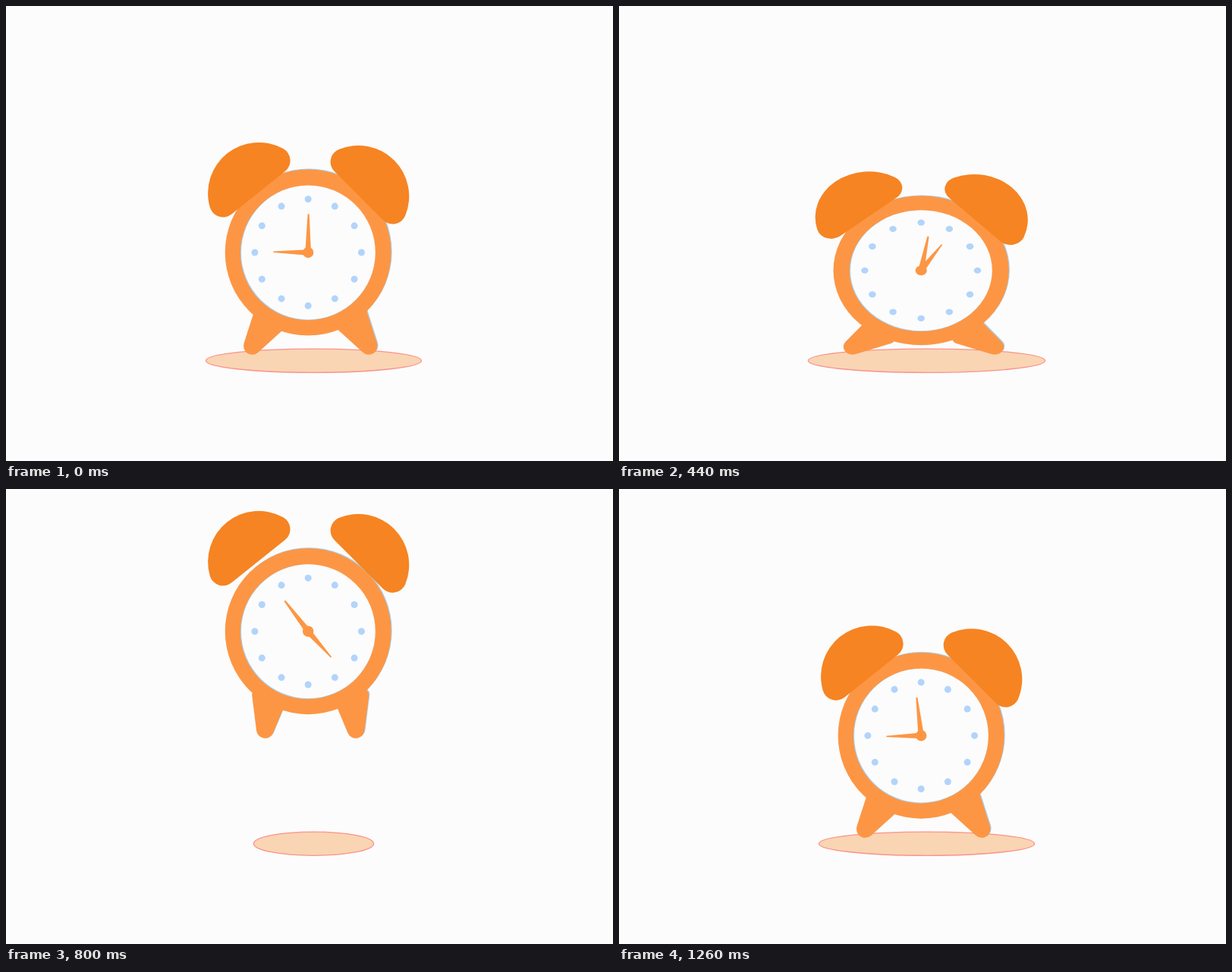
An HTML page for the animation above (1280 ms loop, 800 by 600 pixels).

```html
<!DOCTYPE html>
<html lang="en">
<head>
<meta charset="utf-8">
<title>Jumping alarm clock</title>
<style>
  html, body { margin: 0; width: 100%; height: 100%; overflow: hidden; background: #fcfcfc; }
  svg { display: block; width: 100vw; height: 100vh; }
  .body { fill: #fd9644; }
  .bell { fill: #f68422; }
  .edge { fill: #a9d0f0; }
  .face { fill: #fcfcfc; }
  .dot { fill: #b2d4fb; }
  #shadow { fill: #f9d5b3; stroke: #fc918a; stroke-width: 1.3; }
</style>
</head>
<body>
<svg viewBox="0 0 800 600">
  <defs>
    <path id="footShape" d="M-23.15 0A8 8 0 0 1-15.4-10H15.4A8 8 0 0 1 23.15 0L11.13 44.9A11.5 11.5 0 0 1-11.13 44.9Z"/>
    <path id="bellShape" d="M-45.2-1A18 18 0 0 1-61.8-26A67 67 0 0 1 61.8-26A18 18 0 0 1 45.2-1Z"/>
    <g id="frame">
      <use class="footL" href="#footShape"/>
      <use class="footR" href="#footShape"/>
      <circle r="109.5"/>
    </g>
  </defs>
  <ellipse id="shadow" cx="405.5" cy="467.7" ry="15.6"/>
  <g id="clock">
    <use class="edge" href="#frame" transform="translate(1 -1)"/>
    <use class="body" href="#frame"/>
    <circle class="edge" cx="-.6" cy=".6" r="88.7"/>
    <circle class="face" cx=".2" r="88.4"/>
    <g id="dots" class="dot"></g>
    <g class="body">
      <path id="minute" d="M-3.7-2L-1.1-50Q0-52 1.1-50L3.7-2Z"/>
      <path id="hour" d="M-3.8-2L-.8-45.5Q0-46.8 .8-45.5L3.8-2Z"/>
      <circle r="7.2"/>
    </g>
    <g id="bells" class="bell">
      <use href="#bellShape" transform="translate(-65 -78) rotate(-38.7)"/>
      <use href="#bellShape" transform="translate(66 -74) rotate(45)"/>
    </g>
  </g>
</svg>
<script>
const LOOP = 1280, STEP = 20;   // ms
const FPS = 120, LENGTH = 152;  // keys below count in 1/120 s

const smooth = u => u * u * (3 - 2 * u);
const fall = u => u * u;

// Key poses: crouch, jump, land, settle.
const motion = {
  y: [[0, 325], [36, 355], [47, 355], [90, 187.7], [96, 187.7], [131, 354, fall], [LENGTH, 325]],
  wide: [[0, 1], [32, 1.058], [48, 1.058], [90, 1], [104, 1], [130, 1.055], [LENGTH, 1]],
  tall: [[0, 1], [32, .897], [48, .897], [96, 1], [126, .9], [LENGTH, 1]],
  splay: [[0, 32.7], [42, 67], [80, -2], [115, 20.5], [131, 60], [LENGTH, 32.7]],
  ring: [[0, 0], [52, 0], [76, 4.5], [114, -29], [131, 0], [LENGTH, 0]],
  shadow: [[0, 142], [42, 163.5], [97, 79], [131, 161], [LENGTH, 142]]
};

function valueAt(keys, frame) {
  const i = keys.findIndex(([at]) => at > frame);
  const [start, from] = keys[i - 1];
  const [end, to, ease = smooth] = keys[i];
  return from + (to - from) * ease((frame - start) / (end - start));
}

const $ = id => document.getElementById(id);
const place = (el, value) => el.setAttribute('transform', value);
const footL = document.querySelector('.footL');
const footR = document.querySelector('.footR');

for (let i = 0; i < 12; i++) {
  const a = i * Math.PI / 6;
  $('dots').innerHTML += `<circle cx="${70.3 * Math.sin(a)}" cy="${-70.3 * Math.cos(a)}" r="4.5"/>`;
}

function draw(time) {
  const t = Math.floor(time % LOOP / STEP) * STEP;
  const frame = Math.floor(t * FPS / 1000);
  const turn = 360 * frame / LENGTH;
  const v = {};
  for (const name in motion) v[name] = valueAt(motion[name], frame);

  place($('clock'), `translate(398.2 ${v.y}) scale(${v.wide} ${v.tall})`);
  place($('bells'), `translate(0 ${v.ring})`);
  place(footL, `translate(-51 88) rotate(${v.splay})`);
  place(footR, `translate(57.2 88) rotate(${-v.splay})`);
  place($('minute'), `rotate(${3 * turn + .5})`);
  place($('hour'), `rotate(${turn + 271})`);
  $('shadow').setAttribute('rx', v.shadow);
}

function tick() {
  draw(performance.now());
  requestAnimationFrame(tick);
}
tick();
</script>
</body>
</html>
```
